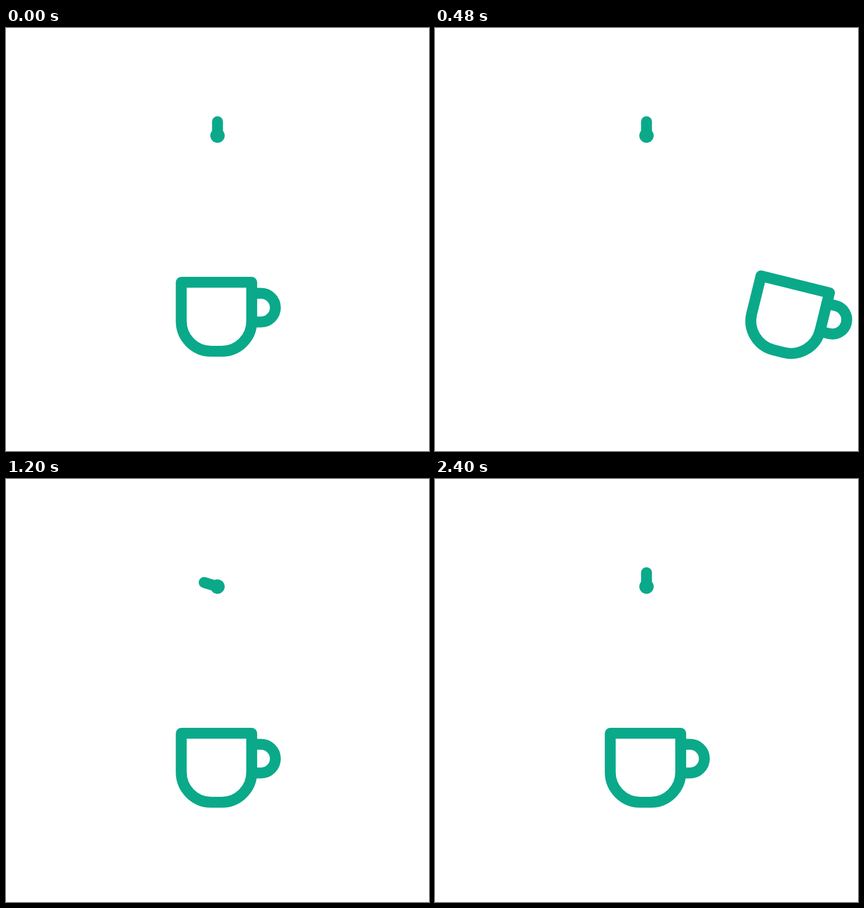
Recreate the animation shown at these times as an HTML page with a canvas. Size 748 by 748 pixels, loop 2.46 s.

```html
<!DOCTYPE html>
<html lang="en">
<head>
<meta charset="utf-8">
<title>Sliding cup and turning hand</title>
<style>
  html, body { margin: 0; width: 100%; height: 100%; overflow: hidden; background: #fff; }
  canvas { display: block; }
</style>
</head>
<body>
<canvas id="stage" width="748" height="748"></canvas>
<script>
const ctx = document.getElementById('stage').getContext('2d');
const COLOR = '#0aa98a';
const LOOP = 2460, STEP = 30, LAST_STEP = 2400;
const SLIDE_TIME = 766, SLIDE_LENGTH = 1131;
const TILT_PER_PX = 0.059;
const HAND_TURN = 290.5;

const rad = deg => deg * Math.PI / 180;
const clamp = x => Math.min(1, Math.max(0, x));
const phase = (t, start, end) => clamp((t - start) / (end - start));
const easeCubic = p => p < 0.5 ? 4 * p ** 3 : 1 - 4 * (1 - p) ** 3;

// The cup leaves on the left and comes back in from the right.
function cupOffset(t) {
  const p = phase(t, 0, SLIDE_TIME);
  const eased = easeCubic(p);
  return SLIDE_LENGTH * (p < 0.5 ? -eased : 1 - eased);
}

function hermite(p, from, to, slope = 0) {
  return from + (to - from) * p * p * (3 - 2 * p) + slope * p * (1 - p) ** 2;
}

// Tilt follows the slide, then rocks to rest.
function cupTilt(t) {
  if (t <= 540) return TILT_PER_PX * Math.abs(cupOffset(t));
  if (t <= 690) return hermite(phase(t, 540, 690), 6.9, -3.6, -13.8);
  if (t <= 785) return hermite(phase(t, 690, 785), -3.6, 1.8);
  return hermite(phase(t, 785, 890), 1.8, 0);
}

function handAngle(t) {
  const forward = easeCubic(phase(t, 530, 1310));
  const back = easeCubic(phase(t, 1325, 2400));
  return HAND_TURN * (forward - back);
}

function drawCup(t) {
  const left = 309.9, right = 434.5, top = 449.7, bottom = 571.6, radius = 53;
  ctx.save();
  ctx.translate(372 + cupOffset(t), 572);
  ctx.rotate(rad(cupTilt(t)));
  ctx.translate(-372, -572);

  ctx.beginPath();
  ctx.moveTo(left, top);
  ctx.lineTo(right, top);
  ctx.arcTo(right, bottom, left, bottom, radius);
  ctx.arcTo(left, bottom, left, top, radius);
  ctx.closePath();
  ctx.stroke();

  ctx.beginPath();
  ctx.moveTo(right, 469.2);
  ctx.arc(451, 494.5, 25.3, -Math.PI / 2, Math.PI / 2);
  ctx.lineTo(right, 519.8);
  ctx.stroke();
  ctx.restore();
}

function drawHand(t) {
  ctx.save();
  ctx.translate(374, 190.3);
  ctx.rotate(rad(handAngle(t)));
  ctx.beginPath();
  ctx.moveTo(0, 0);
  ctx.lineTo(0, -24.7);
  ctx.stroke();
  ctx.beginPath();
  ctx.arc(0, 0, 12.7, 0, 2 * Math.PI);
  ctx.fill();
  ctx.restore();
}

function draw(t) {
  ctx.fillStyle = '#fff';
  ctx.fillRect(0, 0, 748, 748);
  ctx.fillStyle = ctx.strokeStyle = COLOR;
  ctx.lineWidth = 19.3;
  ctx.lineCap = ctx.lineJoin = 'round';
  drawCup(t);
  drawHand(t);
}

const start = performance.now();
function tick() {
  const time = (performance.now() - start) % LOOP;
  draw(Math.min(LAST_STEP, Math.floor(time / STEP) * STEP));
  requestAnimationFrame(tick);
}
tick();
</script>
</body>
</html>
```
